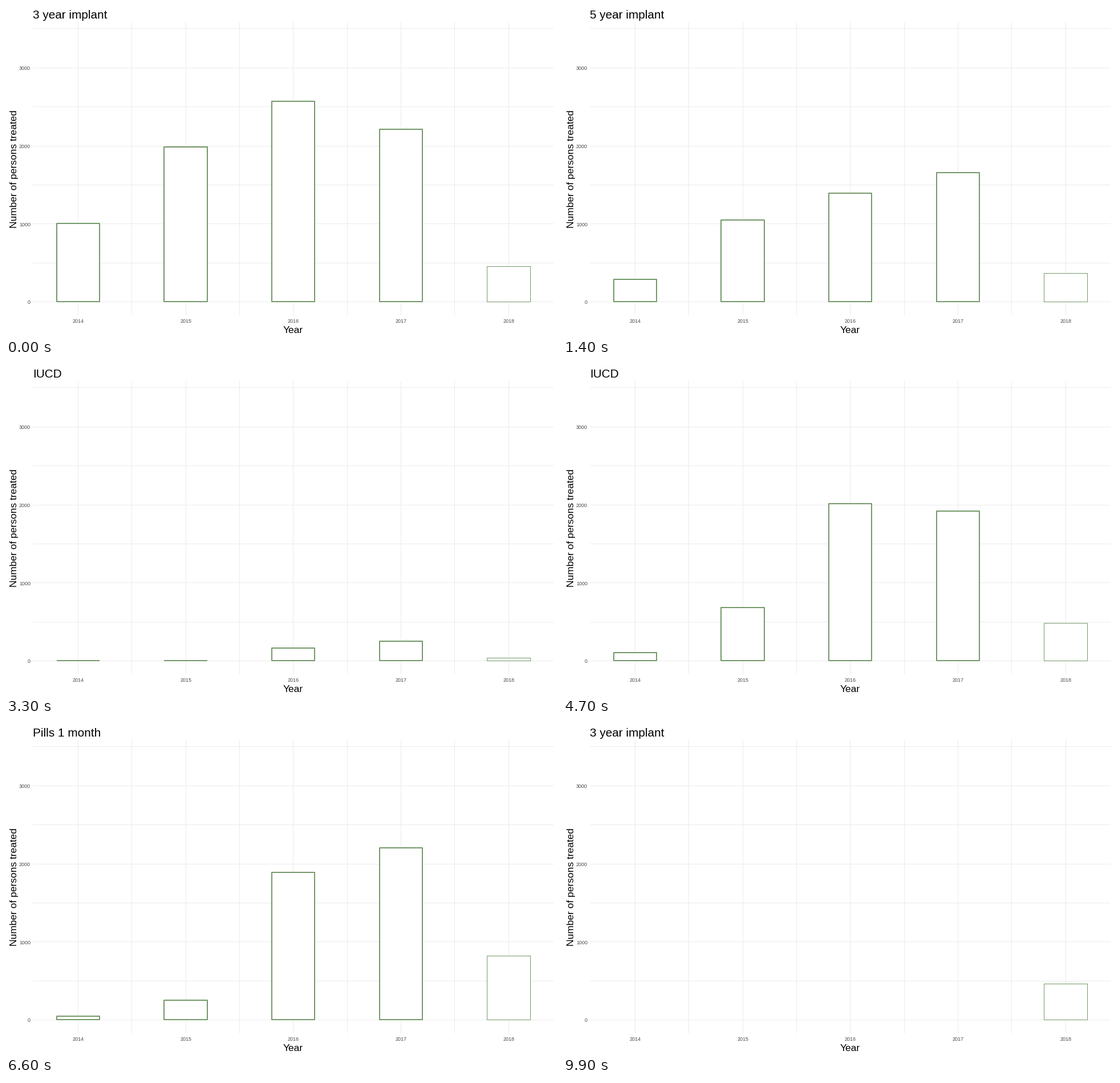
Recreate the animation shown at these times as a matplotlib script. Size 966 by 580 pixels, loop 10 s.

```python
import math

import matplotlib.pyplot as plt
from matplotlib.animation import FuncAnimation
from matplotlib.patches import Rectangle

WIDTH, HEIGHT, DPI = 966, 580, 64
PX = 72 / DPI                      # one pixel in points
LEFT, RIGHT, TOP, BOTTOM = 47, 960, 28, 542
GREEN, GRID = "#74996a", "#ebebeb"
GONE = None

YEARS = range(2014, 2019)
STATES = [
    ("3 year implant", (1006, 1986, 2568, 2209, 454)),
    ("5 year implant", (0, 670, 924, 1436, 331)),
    ("IUCD", (2, 3, 163, 248, 34)),
    ("Depo injection", (176, 1197, 3407, 3171, 818)),
    ("Pills 1 month", (20, 93, 1632, 2044, GONE)),
    ("Pills 3 months", (GONE, GONE, GONE, GONE, 498)),
]
FRAMES, PERIOD, HOLD, STEPS = 100, 17, 9, 7
LAST_DEPARTURE = FRAMES - STEPS
TITLE_STEP = 5

plt.rcParams["font.family"] = "Liberation Sans"


def x_pos(year):
    return 126.6 + (year - 2014) * 188.67


def y_pos(value):
    return 518.4 - value * 0.1367


fig = plt.figure(figsize=(WIDTH / DPI, HEIGHT / DPI), dpi=DPI, facecolor="white")
ax = fig.add_axes([0, 0, 1, 1])
ax.set_xlim(0, WIDTH)
ax.set_ylim(HEIGHT, 0)
ax.axis("off")


def block(x, y, w, h):
    ax.add_patch(Rectangle((x, y), w, h, fc=GRID, lw=0, antialiased=False, zorder=1))


def label(x, y, text, size, color="black", **kw):
    return ax.text(x, y, text, fontsize=size * PX, color=color, va="baseline", **kw)


# Panel grid, with minor lines halfway between the major ones
for i in range(8):
    block(LEFT, math.floor(y_pos(500 * i)), RIGHT - LEFT, 1)
for i in range(9):
    block(math.floor(x_pos(2014 + i / 2)), TOP, 1, BOTTOM - TOP)

# Axis text
for value in range(0, 4000, 1000):
    label(43, y_pos(value) + 3.8, str(value), 9, "#4d4d4d", ha="right")
for year in YEARS:
    label(x_pos(year), 555, str(year), 9, "#4d4d4d", ha="center")
label(503.5, 573, "Year", 17.4, ha="center")
label(19.5, 285.5, "Number of persons treated", 17.4, ha="right",
      rotation=90, rotation_mode="anchor").set_ha("center")
title = label(47.3, 22, "", 20.7)


def make_bar(year):
    width = 1 if year == 2018 else 2
    bar = Rectangle((0, 0), 1, 1, fc="white", ec=GREEN, lw=width * PX,
                    joinstyle="round", snap=False, zorder=3)
    return ax.add_patch(bar)


bars = [make_bar(year) for year in YEARS]


def snap_thin(v):
    return math.floor(v) + 0.5


def snap_thick(v):
    return math.floor(v + 0.3)


def place(bar, year, value):
    bar.set_visible(value is not GONE)
    if value is GONE:
        return
    snap = snap_thin if year == 2018 else snap_thick
    x0, x1 = snap(x_pos(year - 0.2)), snap(x_pos(year + 0.2))
    y0, y1 = snap(y_pos(value)), snap(y_pos(0))
    bar.set_bounds(x0, y0, x1 - x0, y1 - y0)


def blend(a, b, step):
    if a is GONE or b is GONE:
        return b if step == STEPS else a
    return a + (b - a) * step / STEPS


def draw(frame):
    index = min(frame // PERIOD, len(STATES) - 1)
    step = max(0, frame - min(HOLD + PERIOD * index, LAST_DEPARTURE))
    name, values = STATES[index]
    next_name, next_values = STATES[(index + 1) % len(STATES)]
    title.set_text(next_name if step >= TITLE_STEP else name)
    for bar, year, a, b in zip(bars, YEARS, values, next_values):
        place(bar, year, blend(a, b, step))
    return [title, *bars]


anim = FuncAnimation(fig, draw, frames=FRAMES, interval=100,
                     repeat=True, repeat_delay=0)
plt.show()
```
